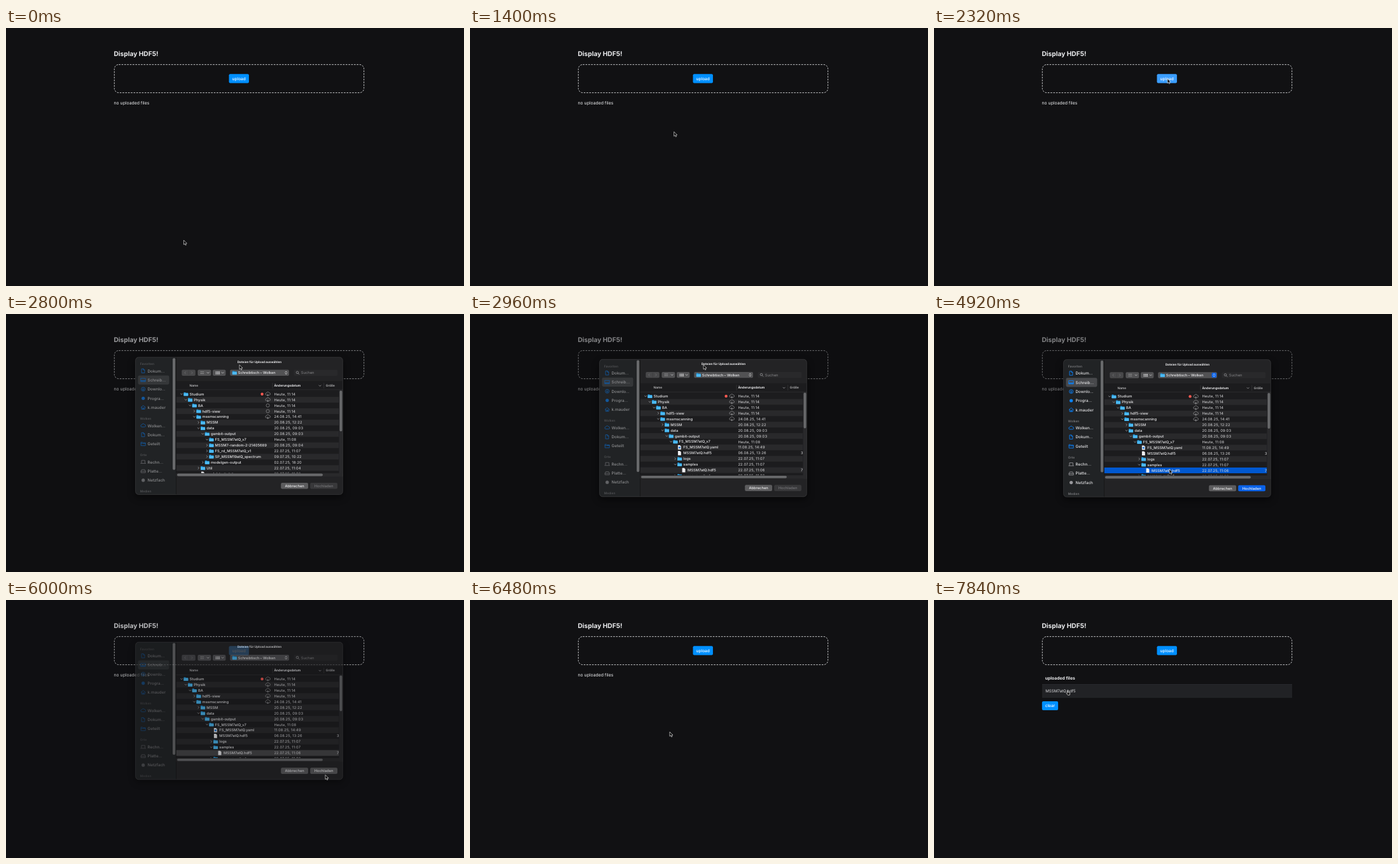
Write an HTML page that moves like this. It is 720 px wide and 405 px high and loops after 8000 ms.

```html
<!DOCTYPE html>
<html lang="de">
<head>
<meta charset="utf-8">
<title>Display HDF5</title>
<style>
  html, body { margin: 0; width: 100%; height: 100%; overflow: hidden; background: #111113; }
  svg { display: block; width: 100vw; height: 100vh; }
  text { font-family: Inter, "Open Sans", sans-serif; white-space: pre; text-rendering: geometricPrecision; }
  .date { letter-spacing: 0.14px; }
</style>
</head>
<body>
<svg id="stage" viewBox="0 0 720 405"></svg>
<script>
const LOOP = 8000;
const NS = 'http://www.w3.org/2000/svg';
const stage = document.getElementById('stage');

function add(parent, tag, attrs = {}) {
  const el = document.createElementNS(NS, tag);
  for (const k in attrs) el.setAttribute(k, attrs[k]);
  parent.appendChild(el);
  return el;
}
const group = (p, attrs) => add(p, 'g', attrs);
const rect = (p, x, y, width, height, fill, rx = 0, more = {}) =>
  add(p, 'rect', { x, y, width, height, fill, rx, ...more });
const circle = (p, cx, cy, r, attrs) => add(p, 'circle', { cx, cy, r, ...attrs });
const line = (p, d, stroke, width = 0.7, more = {}) =>
  add(p, 'path', { d, stroke, 'stroke-width': width, fill: 'none', 'stroke-linejoin': 'round', 'stroke-linecap': 'round', ...more });

// y is the middle of the capital letters
function label(p, x, y, str, size, fill = '#eee', weight = 400, more = {}) {
  const el = add(p, 'text', { x, y: y + size * 0.36, 'font-size': size, 'font-weight': weight, fill, ...more });
  el.textContent = str;
  return el;
}
const mid = { 'text-anchor': 'middle' };
const show = (el, on) => el.setAttribute('visibility', on ? 'visible' : 'hidden');
const paint = (el, fill) => el.setAttribute('fill', fill);

/* ---------- page ---------- */
const page = group(stage);
rect(page, 0, 0, 720, 405, '#111113');
label(page, 169.4, 40.2, 'Display HDF5!', 10.2, '#edeef0', 700);
rect(page, 170.3, 57.4, 392.4, 44.2, 'none', 7, {
  stroke: '#e4e5e7', 'stroke-width': 0.86, 'stroke-dasharray': '2.6 1.75'
});
const uploadBtn = rect(page, 350.5, 72.2, 31.4, 14.4, '#0090ff', 2);
label(page, 366.2, 79.4, 'upload', 6.5, '#fff', 500, mid);

const empty = group(page);
label(empty, 169.5, 118, 'no uploaded files', 6.86, '#edeef0');

const table = group(page);
label(table, 174.7, 122.2, 'uploaded files', 6.8, '#edeef0', 700);
rect(table, 170, 132.2, 393, 20.8, '#212225');
rect(table, 170, 132, 393, 0.5, '#303236');
rect(table, 170, 152.8, 393, 0.5, '#303236');
label(table, 175.2, 142.8, 'MSSM7atQ.hdf5', 6.2, '#dfe0e2');
rect(table, 169.8, 159, 25.3, 14, '#0090ff', 2);
label(table, 182.4, 166, 'clear', 6.5, '#fff', 500, mid);

const dim = rect(stage, 0, 0, 720, 405, '#0c0c0e');

/* ---------- file dialog ---------- */
const defs = add(stage, 'defs');
const blur = add(defs, 'filter', { id: 'blur', x: '-20%', y: '-20%', width: '140%', height: '140%' });
add(blur, 'feGaussianBlur', { stdDeviation: 6 });
rect(add(defs, 'clipPath', { id: 'listClip' }), 267.6, 123, 256, 130.4, '#fff');
rect(add(defs, 'clipPath', { id: 'dialogClip' }), 203.5, 71.5, 326, 215.8, '#fff', 5);

const dialog = group(stage);
rect(dialog, 203, 76, 327, 216, '#000', 6, { filter: 'url(#blur)', opacity: 0.5 });
const body = group(dialog, { 'clip-path': 'url(#dialogClip)' });
rect(body, 203.5, 71.5, 326, 215.8, '#232325');
rect(body, 203.5, 71.5, 63.7, 215.8, '#212325');
rect(body, 267.1, 71.5, 0.5, 215.8, '#0c0c0d');
rect(dialog, 203.6, 71.6, 325.8, 215.6, 'none', 5, { stroke: '#4a4a4c', 'stroke-width': 0.5 });

const BLUE = '#0a84ff', GREY = '#98989c', ACCENT = '#0a62e8';
const cloudPath = (x, y) => `M${x - 2} ${y + 2}a1.7 1.7 0 0 1-.1-3.4a2.3 2.3 0 0 1 4.3-.2a1.8 1.8 0 0 1 0 3.6z`;
const mark = (p, d, c) => line(p, d, c, 0.85);
const icons = {
  doc: (p, y, c) => mark(p, `M213.5 ${y - 3.2}h2.6l1.8 1.8v4.6h-4.4zM216 ${y - 3.2}v1.9h1.9`, c),
  desk: (p, y, c) => {
    mark(p, `M212.2 ${y - 2.6}h7v5.2h-7z`, c);
    line(p, `M212.4 ${y + 1.2}h6.6`, c, 1.4);
  },
  down: (p, y, c) => {
    circle(p, 215.7, y, 3, { fill: 'none', stroke: c, 'stroke-width': 0.85 });
    mark(p, `M215.7 ${y - 1.5}v3M214.4 ${y + 0.3}l1.3 1.3l1.3-1.3`, c);
  },
  dot: (p, y, c) => circle(p, 215.7, y, 2.6, { fill: c }),
  home: (p, y, c) => mark(p, `M212.3 ${y}l3.4-3l3.4 3M213.2 ${y - 0.5}v3.3h5v-3.3M215 ${y + 2.8}v-2h1.4v2`, c),
  cloud: (p, y, c) => mark(p, cloudPath(215.6, y), c),
  folder: (p, y, c) => mark(p, `M212.2 ${y + 2.5}v-5h2.3l.8.9h3.9v4.1zM212.2 ${y - 0.6}h7`, c),
  laptop: (p, y, c) => mark(p, `M213 ${y + 1.4}v-3.8h5.4v3.8M211.8 ${y + 2.2}h7.8`, c),
  disk: (p, y, c) => mark(p, `M212.2 ${y + 2.2}v-1.8l1.2-2.6h4.6l1.2 2.6v1.8zM212.2 ${y + 0.4}h7`, c)
};

const sidebar = group(body);
rect(sidebar, 207.5, 100.2, 49, 14.2, '#48494c', 2.4);
[['Favoriten', 82.3], ['Wolken', 167.8], ['Orte', 225], ['Medien', 282]].forEach(([s, y]) =>
  label(sidebar, 210.8, y, s, 4.9, '#77787b', 600));
[
  [93, 'doc', 'Dokum...'], [107.3, 'desk', 'Schreib...'], [121.7, 'down', 'Downlo...'],
  [136, 'dot', 'Progra...'], [150.3, 'home', 'k.mauder'],
  [179, 'cloud', 'Wolken...'], [193.2, 'doc', 'Dokum...'], [207.5, 'folder', 'Geteilt'],
  [236, 'laptop', 'Rechn...'], [250.2, 'disk', 'Platte...'], [264.6, 'dot', 'Netzfach']
].forEach(([y, icon, name]) => {
  icons[icon](sidebar, y, y > 230 ? GREY : BLUE);
  label(sidebar, 222.6, y, name, 6.25, '#e6e6e8', 500);
});
rect(body, 262, 73, 4.2, 175.4, '#68696b', 2);

label(body, 398.5, 79, 'Dateien für Upload auswählen', 4.75, '#ececee', 700, mid);

function folder(p, x, y) {
  add(p, 'path', { d: `M${x} ${y + 2.4}v-4.7q0-.5.6-.5h2l.8.8h3q.6 0 .6.6v3.8q0 .5-.5.5h-6q-.5 0-.5-.5z`, fill: '#2596d6' });
  rect(p, x, y - 1.2, 7, 4, '#4dbaf3', 0.6);
}
function chevron(p, x, y, open, color = '#b4b4b6') {
  line(p, open ? `M${x - 1.5} ${y - 0.7}l1.5 1.5l1.5-1.5` : `M${x - 0.7} ${y - 1.5}l1.5 1.5l-1.5 1.5`, color, 0.7);
}

// toolbar
rect(body, 276.3, 91.3, 21.5, 9.4, '#48484a', 2);
line(body, 'M282.4 94.4l-1.6 1.6l1.6 1.6M291.6 94.4l1.6 1.6l-1.6 1.6', '#78787a');
rect(body, 286.9, 92.4, 0.4, 7.2, '#343436');
[[301.4, 21], [325, 20.4]].forEach(([x, w]) => {
  rect(body, x, 91.3, w, 9.4, '#525254', 2);
  chevron(body, x + w - 4.8, 96, true, '#dcdcde');
});
line(body, 'M306 94.6h4.8M306 97.2h4.8', '#dcdcde', 0.8, { 'stroke-dasharray': '1 0.9', 'stroke-linecap': 'butt' });
[94.2, 96.6].forEach(y => [329.6, 332, 334.4].forEach(x => rect(body, x, y, 1.6, 1.6, '#dcdcde')));
rect(body, 352.2, 91.3, 92.8, 9.4, '#525254', 2);
folder(body, 355.8, 96);
label(body, 364.8, 96, 'Schreibtisch – Wolken', 5.6, '#f0f0f2', 500);
const popupBox = rect(body, 436.6, 92.2, 7.4, 7.6, BLUE, 1.6);
line(body, 'M439 95.2l1.3-1.4l1.3 1.4M439 96.8l1.3 1.4l1.3-1.4', '#fff', 0.7);
rect(body, 452.3, 91.3, 69, 9.4, '#29292b', 2);
circle(body, 458, 95.5, 1.8, { fill: 'none', stroke: '#a0a0a2', 'stroke-width': 0.7 });
line(body, 'M459.4 96.9l1.6 1.6', '#a0a0a2');
label(body, 463.8, 96, 'Suchen', 5.8, '#858587');

// column headings
rect(body, 267.6, 109, 262, 149.8, '#1c1c1e');
label(body, 288.6, 116, 'Name', 4.8, '#d4d4d6', 500);
label(body, 421.4, 116, 'Änderungsdatum', 4.9, '#ececee', 700);
chevron(body, 493.6, 116.3, true);
label(body, 502.8, 116, 'Größe', 4.8, '#d4d4d6', 500);
[418.8, 499.6].forEach(x => rect(body, x, 111.6, 0.5, 9, '#454547'));
rect(body, 267.6, 122.4, 262, 0.5, '#39393b');

// list
const ROW = 8.93, TOP = 129.4;
const rowY = i => TOP + i * ROW;
const list = group(body, { 'clip-path': 'url(#listClip)' });
const band = (i, fill) => rect(list, 267.6, rowY(i) - ROW / 2, 256, ROW, fill);
for (let i = 1; i < 15; i += 2) band(i, '#29292b');
const selection = band(13, '#0058d0');

// kind: + open folder, > closed folder, f plain file, y text file
function addRow(p, i, [depth, kind, name, date, size]) {
  const y = rowY(i), x = 276 + depth * 6.67;
  if (kind === '+' || kind === '>') {
    chevron(p, x, y, kind === '+');
    folder(p, x + 3.4, y);
  } else {
    add(p, 'path', { d: `M${x + 4.2} ${y - 3.3}h3.2l1.7 1.7v5h-4.9z`, fill: '#f1f1f3' });
    if (kind === 'y') rect(p, x + 5.2, y - 1.2, 2.9, 3, '#2d7fd8');
  }
  label(p, x + 12.6, y, name, 5.75, '#ececee', 500);
  label(p, 421.4, y, date, 5.8, '#dcdcde', 400, { class: 'date' });
  if (size) label(p, 520, y, size, 5.8, '#dcdcde');
}
const common = [
  [0, '+', 'Studium', 'Heute, 11:14'], [1, '+', 'Physik', 'Heute, 11:14'],
  [2, '+', 'BA', 'Heute, 11:14'], [3, '>', 'hdf5-view', 'Heute, 11:14'],
  [3, '+', 'mssmscanning', '24.08.25, 14:41'], [4, '>', 'MSSM', '20.08.25, 12:22'],
  [4, '+', 'data', '20.08.25, 09:03'], [5, '+', 'gambit-output', '20.08.25, 09:03'],
  [6, '+', 'FS_MSSM7atQ_v7', 'Heute, 11:08']
];
const before = [
  [6, '>', 'MSSM7-random-2-21405689', '20.08.25, 09:04'], [6, '>', 'FS_rd_MSSM7atQ_v1', '22.07.25, 11:07'],
  [6, '>', 'SP_MSSM19atQ_spectrum', '09.07.25, 10:22'], [5, '>', 'modelgen-output', '02.07.25, 18:20'],
  [4, '>', 'Util', '22.07.25, 11:04'], [4, 'f', 'model_tests.txt', '22.07.25, 11:08']
];
const after = [
  [7, 'y', 'FS_MSSM7atQ.yaml', '11.08.25, 14:49'], [7, 'f', 'MSSM7atQ.hdf5', '06.08.25, 13:26', '3'],
  [7, '>', 'logs', '22.07.25, 11:07'], [7, '+', 'samples', '22.07.25, 11:07'],
  [8, 'f', 'MSSM7atQ.hdf5', '22.07.25, 11:06', '7'], [7, '>', 'scanner_output', '22.07.25, 11:06']
];
const collapsed = group(list), expanded = group(list);
common.forEach((r, i) => addRow(list, i, r));
before.forEach((r, i) => addRow(collapsed, i + 9, r));
after.forEach((r, i) => addRow(expanded, i + 9, r));

circle(list, 402.6, rowY(0), 2.2, { fill: '#ff5a52' });
function cloudMark(p, i) {
  const y = rowY(i);
  line(p, cloudPath(411.6, y - 0.3), '#a4a4a6', 0.6);
  line(p, `M411.6 ${y}v2.9M410.6 ${y + 2}l1 1l1-1`, '#a4a4a6', 0.6);
}
[0, 1, 4].forEach(i => cloudMark(list, i));
[2, 3].forEach(i => {
  cloudMark(expanded, i);
  circle(collapsed, 411.6, rowY(i), 2.6, { fill: 'none', stroke: '#a4a4a6', 'stroke-width': 0.6 });
});

rect(body, 267.6, 253.6, 262, 5.4, '#29292b');
rect(body, 523.6, 123, 6, 136, '#29292b');
rect(body, 269, 254.3, 229, 3.9, '#68696b', 2);
const scroller = rect(body, 524.5, 124, 3.9, 56, '#68696b', 2);

// buttons
rect(body, 432.2, 268.7, 42.8, 9.6, '#5c5c5e', 2);
label(body, 453.6, 273.5, 'Abbrechen', 5.75, '#f0f0f2', 500, mid);
const okBtn = rect(body, 478.2, 268.7, 42.8, 9.6, '#38383a', 2);
const okText = label(body, 499.6, 273.5, 'Hochladen', 5.75, '#77777a', 500, mid);

/* ---------- pointer ---------- */
const pointer = group(stage);
const arrow = add(pointer, 'path', {
  d: 'M0 0V7L1.6 5.6L2.7 8L3.9 7.5L2.9 5.1H5Z', fill: '#050505', stroke: '#fff', 'stroke-width': 0.6, 'stroke-linejoin': 'round'
});
const hand = add(pointer, 'path', {
  d: 'M1 .4q.7-.6 1.2.2v2.2l2.4.6q.7.3.5 1.2l-.5 2.6h-2.9l-2-2.6q0-.9 1.3-.4z',
  fill: '#050505', stroke: '#fff', 'stroke-width': 0.7, 'stroke-linejoin': 'round'
});

// time, x, y
const path = [
  [0, 279.4, 333], [700, 279.4, 333], [960, 322, 163.3], [1380, 322, 163.3], [1740, 185, 113],
  [1840, 187, 112], [2200, 367, 79.6], [3080, 367, 79.8], [3600, 351, 219.5], [3800, 352, 224],
  [3920, 352, 224], [4400, 370, 243.5], [4960, 370, 243.5], [5560, 502, 274.5], [6160, 502, 274.5],
  [6480, 314, 207], [6560, 259.3, 177.3], [6840, 259.3, 177.3], [7360, 208.6, 142]
];

const clamp = v => Math.max(0, Math.min(1, v));
const span = (t, a, b) => clamp((t - a) / (b - a));
const smooth = u => u * u * (3 - 2 * u);
const easeOut = u => 1 - (1 - u) * (1 - u);

function pointerAt(t) {
  let i = 0;
  while (i < path.length - 2 && t >= path[i + 1][0]) i++;
  const [t0, x0, y0] = path[i], [t1, x1, y1] = path[i + 1];
  const e = smooth(span(t, t0, t1));
  return [x0 + (x1 - x0) * e, y0 + (y1 - y0) * e];
}

function render(t) {
  const [x, y] = pointerAt(t);
  pointer.setAttribute('transform', `translate(${x} ${y})`);
  const onFile = t >= 7320;
  show(arrow, !onFile);
  show(hand, onFile);

  const done = t >= 6840;
  show(empty, !done);
  show(table, done);
  paint(uploadBtn, t >= 2120 && t < 6200 ? '#3b9eff' : '#0090ff');

  const opening = easeOut(span(t, 2560, 3040));
  const closing = span(t, 5880, 6240);
  dim.setAttribute('opacity', 0.48 * opening * (1 - easeOut(closing)));

  const visible = t > 2560 && t < 6240;
  dialog.setAttribute('display', visible ? 'inline' : 'none');
  if (visible) {
    const shift = -15 * (1 - opening) - 16 * closing;
    dialog.setAttribute('transform', `translate(0 ${shift})`);
    dialog.setAttribute('opacity', span(t, 2560, 2760) * (1 - closing * 0.85));
  }

  const active = t >= 3080 && t < 5800;
  const selected = t >= 4400;
  const open = t >= 2880;
  sidebar.setAttribute('opacity', active ? 1 : t < 3080 ? 0.55 : 0.4);
  paint(popupBox, active ? ACCENT : '#525254');
  show(collapsed, !open);
  show(expanded, open);
  scroller.setAttribute('height', open ? 56 : 64);
  show(selection, selected);
  paint(selection, active ? '#0058d0' : '#464648');
  paint(okBtn, !selected ? '#38383a' : active ? ACCENT : '#5c5c5e');
  paint(okText, selected ? '#fff' : '#77777a');
}

const start = performance.now();
function tick() {
  render((performance.now() - start) % LOOP);
  requestAnimationFrame(tick);
}
tick();
</script>
</body>
</html>
```
